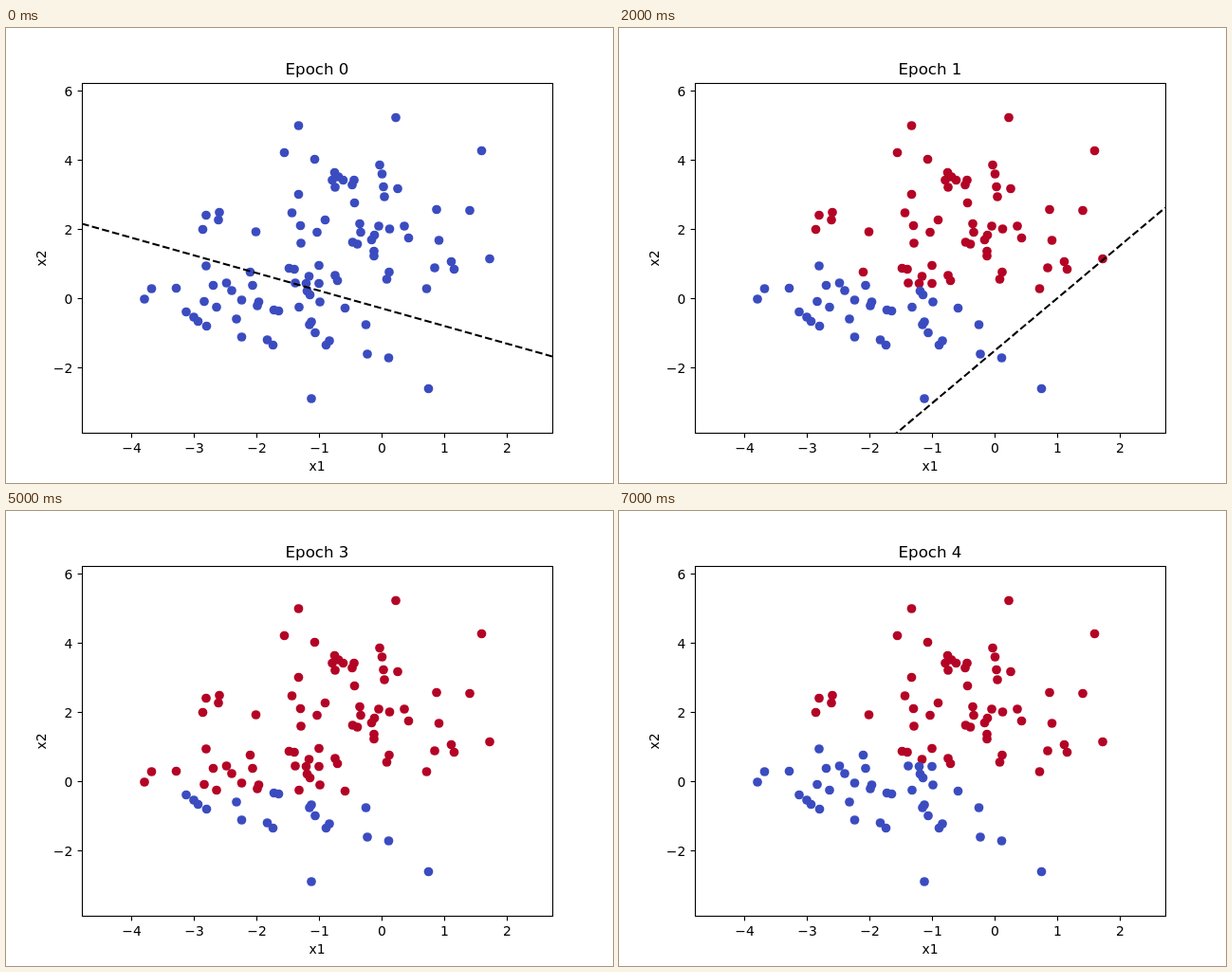
An HTML page that plays this animation: 640x480 px, repeating every 8 s.

```html
<!DOCTYPE html>
<html lang="en">
<head>
<meta charset="utf-8">
<title>Decision boundary by epoch</title>
<style>
  html, body { margin: 0; width: 100%; height: 100%; overflow: hidden; background: #fff; }
  svg { display: block; width: 640px; height: 480px; }
  text { font: 13.89px "DejaVu Sans", sans-serif; text-anchor: middle; }
  #title { font-size: 16.67px; }
  .axis { fill: none; stroke: #000; stroke-width: 1.11; }
  #line { stroke: #000; stroke-width: 2.083; stroke-dasharray: 7.708 3.333; }
</style>
</head>
<body>
<svg viewBox="0 0 640 480">
  <clipPath id="plot"><rect x="80" y="57.6" width="496" height="369.6"/></clipPath>
  <g id="dots"></g>
  <g clip-path="url(#plot)"><line id="line"/></g>
  <rect class="axis" x="80.5" y="58.5" width="496" height="369"/>
  <g id="ticks"></g>
  <text id="title" x="328" y="49">Epoch 0</text>
  <text x="328" y="467">x1</text>
  <text transform="translate(41.5 243) rotate(-90)">x2</text>
</svg>
<script>
const STEP = 1000, STEPS = 8;
const BLUE = '#3b4cc0', RED = '#b40426';
const $ = id => document.getElementById(id);

function add(parent, tag, attrs, text = '') {
  const el = document.createElementNS('http://www.w3.org/2000/svg', tag);
  for (const key in attrs) el.setAttribute(key, attrs[key]);
  el.textContent = text;
  return parent.appendChild(el);
}

// Points grouped by the epochs in which they are predicted red.
const groups = [
  { red: [1, 3, 4], pts: [
    308.5,103, 411,94.5, 501.5,129.5, 293.5,131.5, 325.5,138.5, 394,144.5, 396.5,154,
    346.5,152.5, 350.5,157, 344,160.5, 355.5,160.5, 367,160.5, 347,168, 365,165.5,
    398,167.5, 413,169.5, 399,178, 308.5,175.5, 367.5,184.5, 454,191.5, 489,192.5,
    225,194.5, 211,197.5, 224,202.5, 207.5,212.5, 301.5,195, 336.5,202.5, 310.5,208.5,
    328,215.5, 263.5,215, 311,227, 373,206.5, 374,215.5, 393,209, 404.5,212,
    420,209, 424.5,221.5, 388.5,218.5, 385.5,223.5, 365.5,226, 370.5,228, 388,235.5,
    388,240.5, 456.5,224, 469.5,246.5, 452,253, 443.5,275, 404,257.5, 401.5,265,
    330,250.5, 298.5,253.5, 304,254.5, 319.5,262, 347,261, 349.5,266.5] },
  { red: [1, 2, 3, 4], pts: [472.5,254.5, 510,243.5] },
  { red: [1, 3], pts: [257.5,257.5, 305,269, 316.5,269.5, 330,269.5] },
  { red: [3], pts: [
    146,286, 153.5,275, 179.5,274.5, 211,251, 218.5,271.5, 232.5,269, 238,277,
    260,271.5, 209,288.5, 222,294.5, 248.5,287, 266.5,289, 265,293, 309,294.5,
    317.5,277.5, 320.5,281.5, 331,289, 357.5,295.5] },
  { red: [], pts: [
    190,299.5, 198,305, 202.5,309.5, 211.5,314.5, 243,307, 248.5,326, 282.5,297.5,
    287.5,298.5, 275.5,329, 281.5,334.5, 320,313, 322,310, 326,321.5, 337.5,334.5,
    341,330, 379.5,313, 381,344, 322,391] },
  { red: [2], pts: [403.5,348, 445.5,380.5] },
];

// Boundary end points for each epoch: x1, y1, x2, y2.
const lines = [
  [80, 206.5, 576, 346.5],
  [228.6, 481, 576, 189.5],
  [80, 284.8, 576, 307.2],
  [80, 186.3, 576, 344.7],
];

for (const group of groups) {
  group.el = add($('dots'), 'g', {});
  for (let i = 0; i < group.pts.length; i += 2)
    add(group.el, 'circle', { cx: group.pts[i], cy: group.pts[i + 1], r: 4.86 });
}

const label = n => String(n).replace('-', '\u2212');
for (let n = -4; n <= 2; n++) {
  const x = 396.5 + 66 * n;
  add($('ticks'), 'path', { class: 'axis', d: `M${x} 427.5v4.9` });
  add($('ticks'), 'text', { x, y: 448 }, label(n));
}
for (let n = -2; n <= 6; n += 2) {
  const y = 285.5 - 36.5 * n;
  add($('ticks'), 'path', { class: 'axis', d: `M80.5 ${y}h-4.9` });
  add($('ticks'), 'text', { x: 70.3, y: y + 5.5, style: 'text-anchor:end' }, label(n));
}

// Each epoch shows its predictions first, then its boundary.
let shown = -1;
function show(step) {
  if (step === shown) return;
  shown = step;
  const epoch = Math.ceil(step / 2);
  $('title').textContent = 'Epoch ' + epoch;
  for (const { el, red } of groups)
    el.setAttribute('fill', red.includes(epoch) ? RED : BLUE);
  const hasLine = step % 2 === 0;
  $('line').style.display = hasLine ? '' : 'none';
  if (hasLine)
    ['x1', 'y1', 'x2', 'y2'].forEach((k, i) => $('line').setAttribute(k, lines[epoch][i]));
}

function tick() {
  show(Math.floor(performance.now() / STEP) % STEPS);
  requestAnimationFrame(tick);
}
show(0);
requestAnimationFrame(tick);
</script>
</body>
</html>
```
